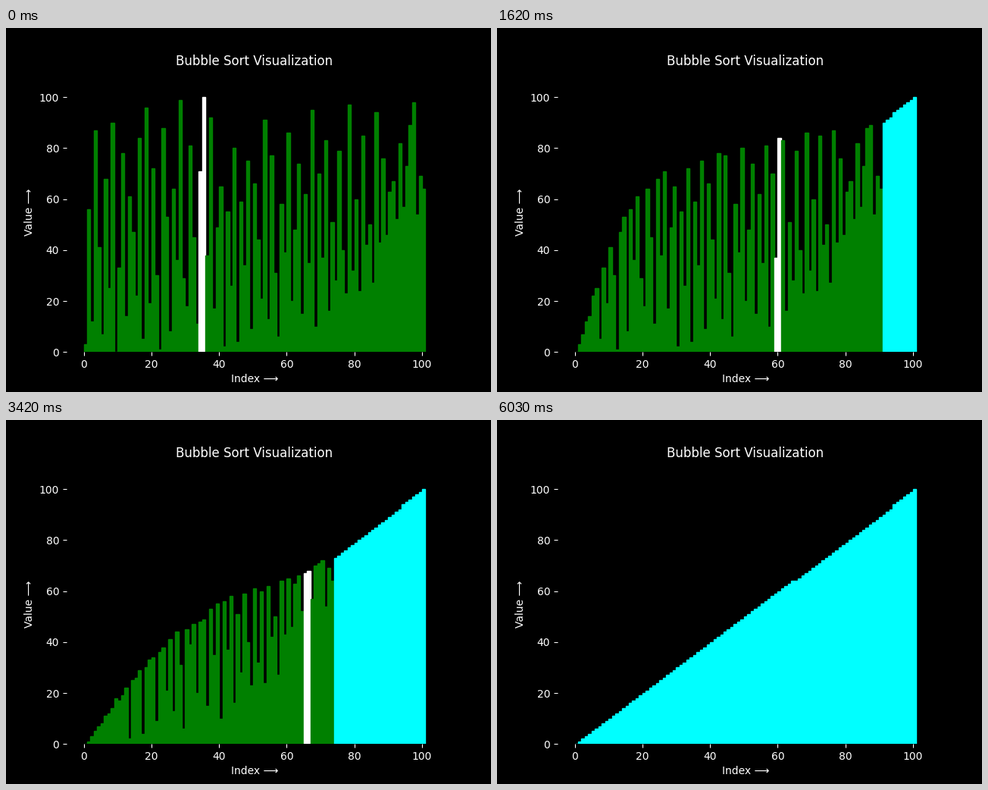
Write a matplotlib script that moves like this. It is 640 px wide and 480 px high and loops after 6.06 s.

```python
import matplotlib.pyplot as plt
from matplotlib.animation import FuncAnimation

STRIDE = 35  # comparisons between two shown steps

VALUES = [
    100, 3, 56, 12, 87, 41, 7, 68, 25, 90, 0, 33, 78, 14, 61, 47, 22, 84, 5, 96,
    19, 72, 30, 1, 88, 53, 8, 64, 36, 99, 29, 18, 81, 45, 11, 71, 38, 92, 17, 49,
    65, 2, 55, 26, 80, 4, 59, 34, 75, 9, 66, 44, 21, 91, 13, 77, 31, 6, 58, 39,
    86, 20, 48, 74, 15, 62, 35, 95, 10, 70, 37, 83, 16, 51, 28, 79, 40, 23, 97, 32,
    60, 24, 85, 42, 50, 27, 94, 43, 76, 46, 63, 67, 52, 82, 57, 73, 89, 98, 54, 69,
    64,
]


def bubble_sort(values):
    """Yield (values, left index of the pair, start of the sorted part)."""
    a = list(values)
    n = len(a)
    count = 0
    for end in range(n, 1, -1):
        for j in range(end - 1):
            count += 1
            shown = count % STRIDE == 0
            if shown:
                yield a[:], j, end
            if a[j] > a[j + 1]:
                a[j], a[j + 1] = a[j + 1], a[j]
                if shown:
                    yield a[:], j, end
    yield a[:], None, 0


# The loop opens just after the first shown swap.
steps = list(bubble_sort(VALUES))[1:]

fig, ax = plt.subplots(figsize=(6.4, 4.8), dpi=100, facecolor="black")
ax.set_facecolor("black")
bars = ax.bar(range(len(VALUES)), VALUES, width=1, align="edge", color="green")
ax.set_ylim(0, 110)
ax.set_title("Bubble Sort Visualization", color="white")
ax.set_xlabel("Index ⟶", color="white")
ax.set_ylabel("Value ⟶", color="white")
ax.tick_params(colors="white")
ax.spines[:].set_visible(False)


def bar_color(i, pair, end):
    if i >= end:
        return "cyan"
    if pair is not None and i in (pair, pair + 1):
        return "white"
    return "green"


def update(frame):
    values, pair, end = steps[frame]
    for i, (bar, value) in enumerate(zip(bars, values)):
        bar.set_height(value)
        bar.set_color(bar_color(i, pair, end))
    return bars


anim = FuncAnimation(fig, update, frames=len(steps), interval=30, repeat=True)
plt.show()
```
